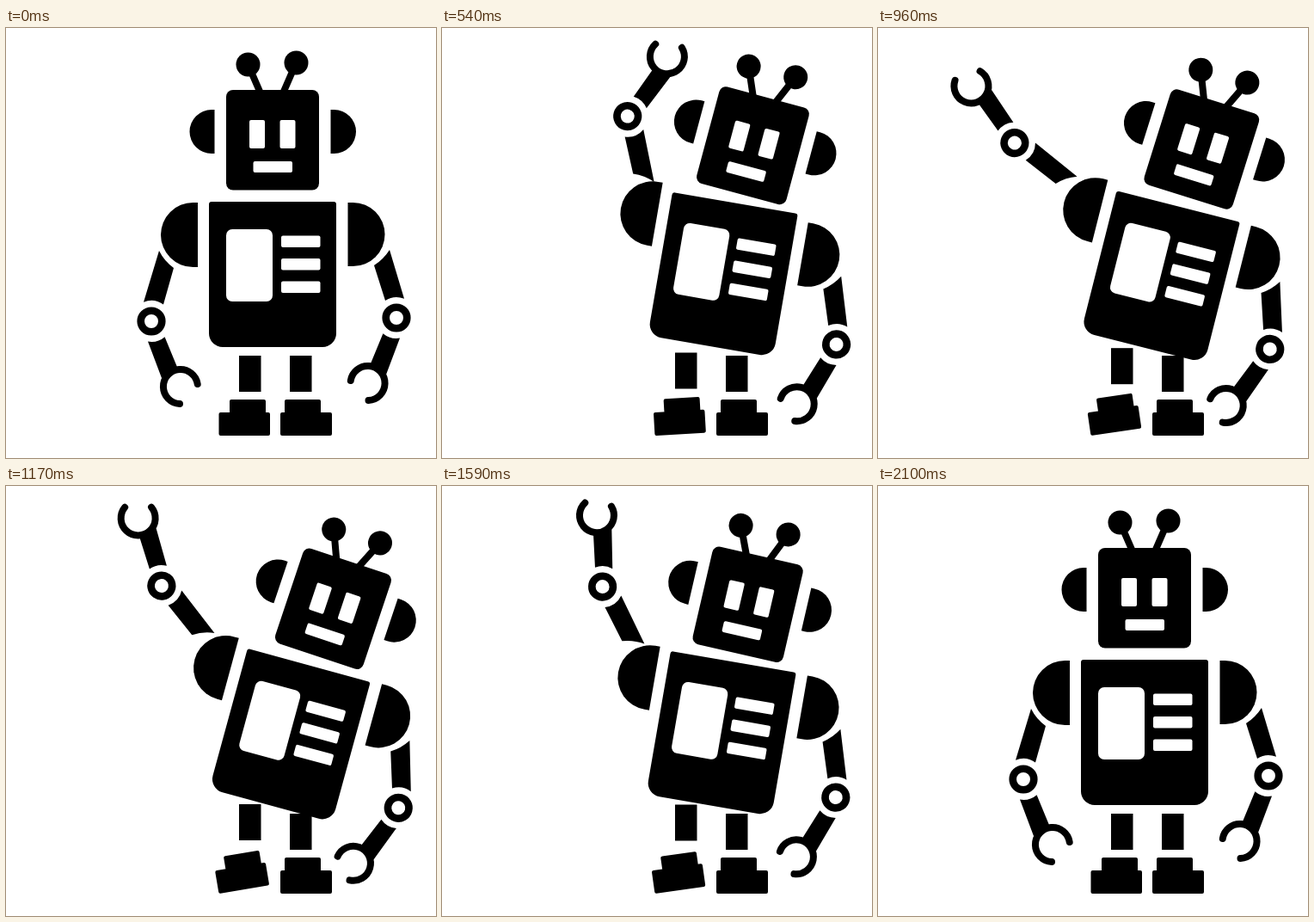
These frames come from a looping animation (500 px wide and 500 px high, 2.7 s). An HTML page:

```html
<!DOCTYPE html>
<html lang="en">
<head>
<meta charset="utf-8">
<title>Waving robot</title>
<style>
  html, body { margin: 0; width: 100%; height: 100%; overflow: hidden; background: #fff; }
  svg { display: block; width: 100%; height: 100%; }
  .hole { fill: #fff; }
  .line { fill: none; stroke: #000; stroke-width: 8; }
  .claw { stroke-linecap: round; }
</style>
</head>
<body>
<svg viewBox="0 0 500 500">
  <defs>
    <!-- Origin at the elbow -->
    <g id="elbow"><circle r="12.3" class="line" style="stroke-width:8.6"/></g>
    <path id="bone" d="M-4 23.6A24 24 0 0 0 15.6 18.2L32 58L12 66Z"/>
    <path id="claw" class="line claw" d="M-1 20A20 20 0 1 1 19.7 -3"/>
  </defs>

  <rect x="330" y="381" width="25.5" height="42"/>
  <rect x="319" y="447" width="60" height="27" rx="2"/>
  <rect x="324" y="432" width="42" height="17" rx="2"/>
  <rect id="leg" x="271" y="381" width="25.5" height="42"/>
  <g id="foot">
    <rect x="247.5" y="447" width="59.5" height="27" rx="2"/>
    <rect x="260" y="432" width="42" height="17" rx="2"/>
  </g>

  <g id="body">
    <path d="M239 202H381a3 3 0 0 1 3 3V355a16 16 0 0 1 -16 16H252a16 16 0 0 1 -16 -16V205a3 3 0 0 1 3 -3Z"/>
    <g class="hole">
      <rect x="256" y="234" width="54" height="84" rx="7"/>
      <rect x="320" y="241.5" width="45.5" height="13.5" rx="2"/>
      <rect x="320" y="268" width="45.5" height="13.5" rx="2"/>
      <rect x="320" y="294.5" width="45.5" height="13.5" rx="2"/>
    </g>
    <g id="left">
      <path d="M223 203V278H217.5A37.5 37.5 0 0 1 217.5 203Z"/>
      <g id="upper">
        <g transform="translate(169 341)">
          <path d="M9 -82Q15 -70 26 -62L14 -19.5A24 24 0 0 0 -9 -22.3Z"/>
          <use href="#elbow"/>
          <g id="fore">
            <use href="#bone"/>
            <g transform="translate(34 76)"><use id="hand" href="#claw"/></g>
          </g>
        </g>
      </g>
    </g>
    <g id="right">
      <path d="M397.5 203V277H403.5A37 37 0 0 0 403.5 203Z"/>
      <g transform="translate(454 337) scale(-1 1)">
        <path d="M8 -79Q15 -68 26 -61L13 -20A24 24 0 0 0 -9 -22.3Z"/>
        <use href="#elbow"/>
        <use href="#bone"/>
        <use href="#claw" x="33.5" y="76"/>
      </g>
    </g>
  </g>

  <g id="head">
    <path class="line" d="M296 76L283 46M322 76L335 46"/>
    <circle cx="281.5" cy="42.5" r="14"/>
    <circle cx="337.5" cy="40.5" r="14"/>
    <rect x="256" y="72" width="108" height="116.5" rx="8"/>
    <path d="M242.5 95V146H239A25.5 25.5 0 0 1 239 95Z"/>
    <path d="M377.5 95V146H381.5A25.5 25.5 0 0 0 381.5 95Z"/>
    <g class="hole">
      <rect x="283" y="107" width="18" height="33" rx="2"/>
      <rect x="318.5" y="107" width="18" height="33" rx="2"/>
      <rect x="287.5" y="155" width="45.5" height="13" rx="2"/>
    </g>
  </g>
</svg>
<script>
const LOOP = 2700, STEP = 30;
const POSES = [0, 240, 540, 780, 1170, 1590, 2100];
const SWING = [0, 600, 1020, 1440, 2100];
const WAVE = [0, 240, 540, 780, 1020, 1170, 1440, 1590, 2100];

// Smooth curve through the keys that rests at every extreme.
function track(times, values) {
  const rise = i => (values[i + 1] - values[i]) / (times[i + 1] - times[i]);
  const slopes = values.map((_, i) => {
    if (i === 0 || i === values.length - 1) return 0;
    const a = rise(i - 1), b = rise(i);
    return a * b > 0 ? 2 * a * b / (a + b) : 0;
  });
  return t => {
    if (t >= times[times.length - 1]) return values[values.length - 1];
    const i = times.findIndex(end => end > t) - 1;
    const span = times[i + 1] - times[i], u = (t - times[i]) / span, v = 1 - u;
    return v * v * ((1 + 2 * u) * values[i] + u * span * slopes[i])
         + u * u * ((1 + 2 * v) * values[i + 1] - v * span * slopes[i + 1]);
  };
}

const pose = (...values) => track(POSES, values);
const motion = {
  bodyX: pose(0, 5.5, 16.5, 17, 20, 14.5, 0),
  bodyY: pose(0, -1, 0.3, 2, 3.5, 1.3, 0),
  bodyTurn: pose(0, 4.3, 9.8, 12.5, 15.3, 9.8, 0),
  headX: pose(0, 20, 51.5, 60.3, 70.5, 45.7, 0),
  headY: pose(0, 2, 6.5, 8.5, 12.5, 7.5, 0),
  headTurn: pose(0, 5.5, 15, 16, 18.5, 13, 0),
  leftLift: pose(0, -4, -10, -11, -10, -4, 0),
  rightDrop: pose(0, 1.5, 7, 3, -2.5, 0, 0),
  footTurn: pose(0, -0.5, -3.3, -6.5, -9.5, -8, 0),
  legY: pose(0, -1, -3.5, -6, -11, -10.5, 0),
  upper: track(SWING, [0, 146, 95, 147, 0]),
  fore: track(WAVE, [0, 39, 86, 74, 52, 59.5, 71, 62, 0]),
  wrist: track(WAVE, [0, -4, -2, 35, 42, 43, 40, 36, 0])
};

function place(id, x, y, turn = 0, cx = 0, cy = 0) {
  document.getElementById(id).setAttribute('transform',
    `translate(${x} ${y}) rotate(${turn} ${cx} ${cy})`);
}

function draw(t) {
  const m = {};
  for (const name in motion) m[name] = motion[name](t);
  place('body', m.bodyX, m.bodyY, m.bodyTurn, 310, 286.5);
  place('head', m.headX, m.headY, m.headTurn, 310, 130);
  place('left', 0, m.leftLift);
  place('right', 0, m.rightDrop);
  place('upper', 0, 0, m.upper, 205, 237.5);
  place('fore', 0, 0, m.fore);
  place('hand', 0, 0, m.wrist);
  place('foot', 0, 0, m.footTurn, 248, 474);
  place('leg', 0, m.legY);
}

const start = performance.now();
function tick() {
  const t = (performance.now() - start) % LOOP;
  draw(Math.floor(t / STEP) * STEP);
  requestAnimationFrame(tick);
}
tick();
</script>
</body>
</html>
```
